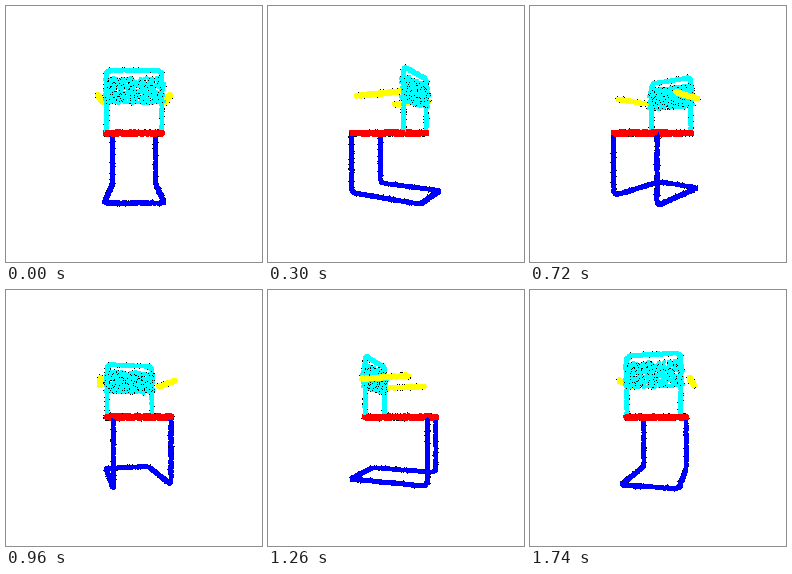
An HTML page with a canvas for the animation above (1800 ms loop, 256x256 px).

```html
<!DOCTYPE html>
<html lang="en">
<head>
<meta charset="utf-8">
<title>Turning chair</title>
<style>
html, body { margin: 0; width: 100%; height: 100%; overflow: hidden; background: #fff; }
canvas { display: block; width: 256px; height: 256px; }
</style>
</head>
<body>
<canvas id="stage" width="256" height="256"></canvas>
<script>
const ctx = document.getElementById('stage').getContext('2d');
const BLUE = '#0000ff', RED = '#ff0000', CYAN = '#00ffff', YELLOW = '#ffff00';
const STEP = 60, STEPS = 30;
const CX = 128.1, CY = 127.5, DIST = 222;
const FLOOR = -58, FRONT = -36, REAR = 37, BACK = 22, HALF = 25, TOP = 57;

let seed = 7;
function rand() {
  seed = (seed * 1664525 + 1013904223) % 4294967296;
  return seed / 4294967296;
}
const spread = r => (rand() * 2 - 1) * r;
const mix = (a, b, k) => a.map((v, i) => v + (b[i] - v) * k);
const gap = (a, b) => Math.hypot(a[0] - b[0], a[1] - b[1], a[2] - b[2]);

// Points are [across, up, depth]; rough points keep their dark speck on top.
const cloud = [];
function add(x, y, z, color, rough = false) {
  const side = Math.floor(rand() * 4);
  cloud.push({
    x, y, z, color, rough,
    speck: rand() < (rough ? 0.85 : 0.3),
    dx: side === 0 ? -2 : side === 1 ? 2 : Math.round(spread(1)),
    dy: side === 2 ? -2 : side === 3 ? 2 : Math.round(spread(1))
  });
}

function bend(path, r) {
  const out = [path[0]];
  for (let i = 1; i < path.length - 1; i++) {
    const p = path[i];
    for (const q of [path[i - 1], path[i + 1]]) out.push(mix(p, q, r / gap(p, q)));
  }
  out.push(path[path.length - 1]);
  return out;
}

function tube(path, r, color, density = 6) {
  for (let i = 1; i < path.length; i++) {
    const a = path[i - 1], b = path[i];
    const n = Math.ceil(gap(a, b) * density);
    for (let k = 0; k < n; k++) {
      const p = mix(a, b, (k + rand()) / n);
      const turn = rand() * Math.PI * 2, tilt = spread(1);
      const flat = Math.sqrt(1 - tilt * tilt) * r;
      add(p[0] + flat * Math.cos(turn), p[1] + tilt * r, p[2] + flat * Math.sin(turn), color);
    }
  }
}

// Cantilever frame
tube(bend([
  [-HALF, 0, FRONT], [-HALF, FLOOR, FRONT], [-HALF, FLOOR, REAR],
  [HALF, FLOOR, REAR], [HALF, FLOOR, FRONT], [HALF, 0, FRONT]
], 3), 1, BLUE);

// Seat
tube([
  [-HALF, 0.4, FRONT], [HALF, 0.4, FRONT], [HALF, 0.4, BACK],
  [-HALF, 0.4, BACK], [-HALF, 0.4, FRONT]
], 1.9, RED, 9);

// Backrest
tube(bend([
  [-HALF, 2, BACK], [-HALF, TOP, BACK], [HALF, TOP, BACK], [HALF, 2, BACK]
], 3), 1, CYAN);
for (let i = 0; i < 520; i++) {
  add(spread(27), 38.7 + spread(11.5), BACK + spread(3), CYAN, true);
}

// Armrests
for (const s of [-1, 1]) {
  tube([[s * 32.5, 34.5, BACK], [s * 34.3, 34.5, -22]], 1.5, YELLOW);
}

function draw(angle) {
  const c = Math.cos(angle), s = Math.sin(angle);
  const dots = cloud.map(p => {
    const z = p.z * c - p.x * s;
    const k = DIST / (DIST - z);
    return {
      p, z,
      x: Math.floor(CX + (p.x * c + p.z * s) * k),
      y: Math.floor(CY - p.y * k)
    };
  }).sort((a, b) => a.z - b.z);

  const speck = d => {
    ctx.fillStyle = '#000';
    ctx.fillRect(d.x + d.p.dx, d.y + d.p.dy, 1, 1);
  };

  ctx.fillStyle = '#fff';
  ctx.fillRect(0, 0, 256, 256);
  for (const d of dots) {
    if (d.p.speck && !d.p.rough) speck(d);
  }
  for (const d of dots) {
    if (d.p.speck && d.p.rough) speck(d);
    ctx.fillStyle = d.p.color;
    ctx.fillRect(d.x - 1, d.y - 1, 3, 3);
  }
}

let shown = -1;
function tick() {
  const step = Math.floor(performance.now() / STEP) % STEPS;
  if (step !== shown) {
    shown = step;
    draw(step / STEPS * Math.PI * 2);
  }
  requestAnimationFrame(tick);
}
tick();
</script>
</body>
</html>
```
